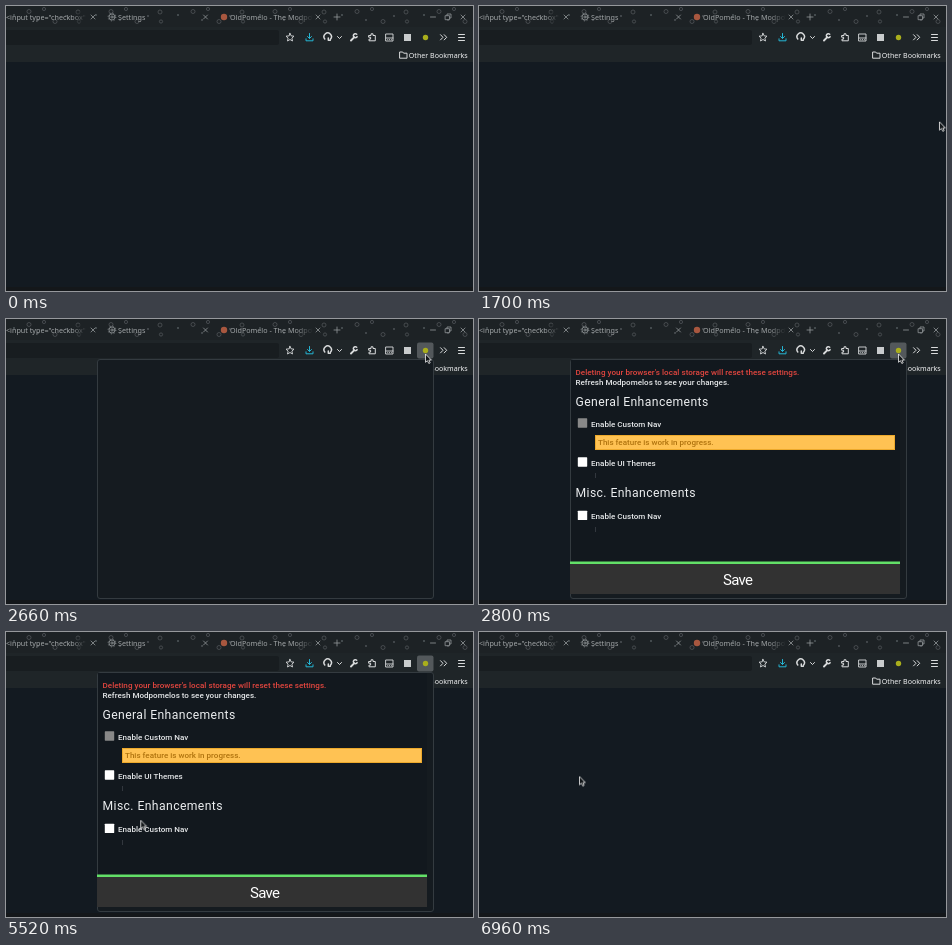
Write an HTML page that moves like this. It is 467 px wide and 285 px high and loops after 7 s.

```html
<!DOCTYPE html>
<html lang="en">
<head>
<meta charset="utf-8">
<title>Browser add-on settings</title>
<style>
html, body { margin: 0; width: 100%; height: 100%; overflow: hidden; background: #131a21; }
svg { display: block; width: 100vw; height: 100vh; }
text { white-space: pre; }
.ui { font: 7.2px "Noto Sans", sans-serif; fill: #a3a7a9; }
.bookmarks { font-size: 7.1px; fill: #f1f2f3; }
.pop { font: 500 8.05px Roboto, sans-serif; fill: #e6e8ea; }
.warn { fill: #e2463f; letter-spacing: .03px; }
.notice { fill: #b0730e; }
.head { font: 400 12.2px Roboto, sans-serif; letter-spacing: .4px; fill: #eceef0; }
.save { font: 400 15px Roboto, sans-serif; letter-spacing: -.7px; fill: #fff; }
.line { fill: none; stroke: #d9dbdc; stroke-width: 1; stroke-linecap: round; stroke-linejoin: round; }
.dim { stroke: #92979a; stroke-width: .8; }

.step { animation: 7s step-end infinite; }
.folder-hover { animation-name: folder-hover; }
.addon-hover { animation-name: addon-hover; }
.panel { animation-name: panel; }
.content { animation-name: content; }
.box-hover { animation-name: box-hover; }
.checked { animation-name: checked; }
.cursor { animation: move 7s linear infinite, seen 7s step-end infinite; }

@keyframes folder-hover { 0%, 31.2% { opacity: 0 } 28.8% { opacity: 1 } }
@keyframes addon-hover {
  0%, 99.42% { opacity: 0; fill: #3f4548 }
  31.2% { opacity: 1; fill: #3f4548 }
  37.99% { opacity: 1; fill: #53585b }
}
@keyframes panel { 0%, 99.42% { opacity: 0 } 37.99% { opacity: 1 } }
@keyframes content { 0% { opacity: 0 } 38.85% { opacity: .6 } 39.99% { opacity: 1 } }
@keyframes box-hover { 0%, 99.42% { opacity: 0 } 86.28% { opacity: 1 } }
@keyframes checked { 0%, 99.42% { opacity: 0 } 89.99% { opacity: .4 } 90.56% { opacity: .75 } 90.84% { opacity: 1 } }
@keyframes seen { 0% { opacity: 0 } 16.85% { opacity: 1 } }
@keyframes move {
  0%, 16.85% { transform: translate(4px, 7px) }
  18% { transform: translate(84px, 82px) }
  19% { transform: translate(182px, 158px) }
  20% { transform: translate(286px, 220px) }
  21% { transform: translate(372px, 252px) }
  22% { transform: translate(428px, 242px) }
  23% { transform: translate(454px, 186px) }
  24.286% { transform: translate(460px, 116px) }
  25.5% { transform: translate(457px, 96px) }
  26.857% { transform: translate(451px, 83px) }
  28.571% { transform: translate(438px, 59px) }
  30% { transform: translate(425px, 47px) }
  31.5% { transform: translate(421px, 39px) }
  34.286%, 71.41% { transform: translate(419px, 35px) }
  71.42%, 71.9% { transform: translate(394px, 140px) }
  73.3% { transform: translate(352px, 200px) }
  74.9% { transform: translate(290px, 230px) }
  76.6% { transform: translate(214px, 222px) }
  78.4% { transform: translate(146px, 196px) }
  79.8% { transform: translate(111px, 173px) }
  81.143%, 81.5% { transform: translate(96px, 160px) }
  82.571%, 85% { transform: translate(95.5px, 139px) }
  87.714%, 100% { transform: translate(100px, 144.5px) }
}
</style>
</head>
<body>
<svg viewBox="0 0 467 285" preserveAspectRatio="none">
  <defs>
    <pattern id="bubbles" width="82" height="21" patternUnits="userSpaceOnUse">
      <g fill="none" stroke="#4c5256" stroke-width=".8">
        <circle cx="72" cy="6" r="2"/>
        <circle cx="23" cy="5.5" r="2"/>
        <circle cx="49" cy="15.5" r="2"/>
        <circle cx="73" cy="15.5" r="1.6"/>
        <circle cx="38" cy="3" r="1.6"/>
      </g>
      <g fill="#50565a">
        <circle cx="8" cy="9" r="1"/>
        <circle cx="60" cy="10" r=".9"/>
        <circle cx="32" cy="14" r=".9"/>
      </g>
    </pattern>
    <linearGradient id="fade">
      <stop stop-color="#1d2225" stop-opacity="0"/>
      <stop offset="1" stop-color="#1d2225"/>
    </linearGradient>
    <path id="x" class="line dim" d="M-2-2 2 2M2-2-2 2"/>
    <rect id="box" width="9.4" height="9.4" rx=".6"/>
  </defs>

  <!-- window -->
  <rect width="467" height="285" fill="#131a21"/>
  <rect y="281" width="467" height="4" fill="#14171a"/>
  <rect width="467" height="56" fill="#1f2528"/>
  <rect width="467" height="21" fill="#1d2225"/>
  <rect width="467" height="21" fill="url(#bubbles)"/>
  <rect x="-5" y="24" width="278" height="15" rx="2" fill="#181d20"/>

  <!-- tabs -->
  <g class="ui">
    <text x="0" y="13.5">&lt;input type="checkbox"</text>
    <text x="112" y="13.5">Settings</text>
    <text x="224" y="13.5">OldPomelo - The Modpo</text>
  </g>
  <rect x="66" y="5" width="15" height="12" fill="url(#fade)"/>
  <rect x="290" y="5" width="17" height="12" fill="url(#fade)"/>
  <use href="#x" x="87" y="11"/>
  <use href="#x" x="199.5" y="11"/>
  <use href="#x" x="312" y="11"/>
  <use href="#x" x="457" y="11"/>
  <g class="line dim">
    <circle cx="106" cy="11" r="3"/>
    <circle cx="106" cy="11" r="1.1"/>
    <circle cx="106" cy="11" r="3.9" stroke-dasharray="1.2 1.863" stroke-linecap="butt"/>
    <path d="M328 11h6M331 8v6M424.5 11h5M439.5 9.7h4v4h-4zM441 9.5V8h4v4h-1.3"/>
  </g>
  <circle cx="218" cy="11" r="3.2" fill="#a8573f"/>

  <!-- toolbar -->
  <rect class="step addon-hover" x="411" y="23.5" width="16.5" height="16" rx="2"/>
  <g class="line">
    <path d="M284 27.3l1.2 2.6 2.8.3-2.1 1.9.6 2.9-2.5-1.5-2.5 1.5.6-2.9-2.1-1.9 2.8-.3z" stroke-width=".9"/>
    <path d="M303.5 27.5v4.8M301.5 30.5l2 2 2-2M300 32.8v2h7v-2" stroke="#25b5d3"/>
    <path d="M318.8 33a3.7 3.7 0 1 1 5.8 0M322.3 32v2.3h2" stroke-width="1.5"/>
    <path d="M331.5 30.5l2 2 2-2"/>
    <path d="M345 34.5l3.3-3.3" stroke-width="1.9"/>
    <path d="M350.7 28.2a2 2 0 1 0 .4 2.4" stroke-width="1.5"/>
    <path d="M363 29.5h2v-1.7h2v1.7h2.3v5.3H363v-1.7h1.6v-1.9H363z"/>
    <path d="M380 28h7v7h-7zM380 32h7M381.7 33.6h.1M383.5 33.6h.1M385.3 33.6h.1" stroke-width=".9"/>
    <path d="M434.5 28.7l2.5 2.6-2.5 2.6M438.2 28.7l2.5 2.6-2.5 2.6"/>
    <path d="M452.5 28.5h6M452.5 31.5h6M452.5 34.5h6"/>
  </g>
  <rect x="398" y="28" width="7" height="7" fill="#c9cccd"/>
  <circle cx="419.5" cy="31.5" r="2.7" fill="#a9ae1c"/>

  <!-- bookmarks bar -->
  <rect class="step folder-hover" x="391" y="42" width="73" height="13" rx="2" fill="#45494c"/>
  <path class="line" stroke-width=".9" d="M394 46h2.7l.9 1.2h3.4v5H394z"/>
  <text class="ui bookmarks" x="402.8" y="51.8">Other Bookmarks</text>

  <!-- add-on panel -->
  <g class="step panel">
    <rect x="91.5" y="40.5" width="336" height="239" rx="2.5" fill="#151b20" stroke="#343b40"/>
    <g class="step content">
      <rect x="92" y="41" width="329" height="234" fill="#12181e"/>
      <g class="pop">
        <text class="warn" x="96.5" y="56">Deleting your browser's local storage will reset these settings.</text>
        <text x="96.5" y="65.5">Refresh Modpomelos to see your changes.</text>
        <text x="112" y="108.3">Enable Custom Nav</text>
        <text x="112" y="146.8">Enable UI Themes</text>
        <text x="112" y="200">Enable Custom Nav</text>
      </g>
      <text class="head" x="96.5" y="86.8">General Enhancements</text>
      <text class="head" x="96.5" y="178.3">Misc. Enhancements</text>
      <rect x="116.5" y="116.5" width="299" height="14" fill="#ffc253" stroke="#eda92c"/>
      <text class="pop notice" x="119" y="126.3">This feature is work in progress.</text>
      <path d="M116.5 154v5M116.5 208v5" stroke="#3b4147" stroke-width=".8"/>
      <use href="#box" x="98.8" y="99.3" fill="#888"/>
      <use href="#box" x="98.8" y="138.3" fill="#fff"/>
      <use href="#box" x="98.8" y="191.7" fill="#fff"/>
      <use class="step box-hover" href="#box" x="98.8" y="138.3" fill="#e8e8e8"/>
      <g class="step checked">
        <use href="#box" x="98.8" y="138.3" fill="#e41be6"/>
        <path d="M100.7 143l2.1 2.3 3.9-4.6" fill="none" stroke="#fff" stroke-width="1.4"/>
      </g>
      <rect x="91" y="244" width="330" height="31" fill="#323232"/>
      <rect x="91" y="242.5" width="330" height="2.5" fill="#63e068"/>
      <text class="save" x="258.7" y="265.5" text-anchor="middle">Save</text>
    </g>
  </g>

  <path class="cursor" d="M.5 0v8.3l1.9-1.6 1.4 2.8 1.4-.7-1.3-2.7h2.5z" fill="#14181b" stroke="#f2f2f2" stroke-width=".8" stroke-linejoin="round"/>
</svg>
</body>
</html>
```
